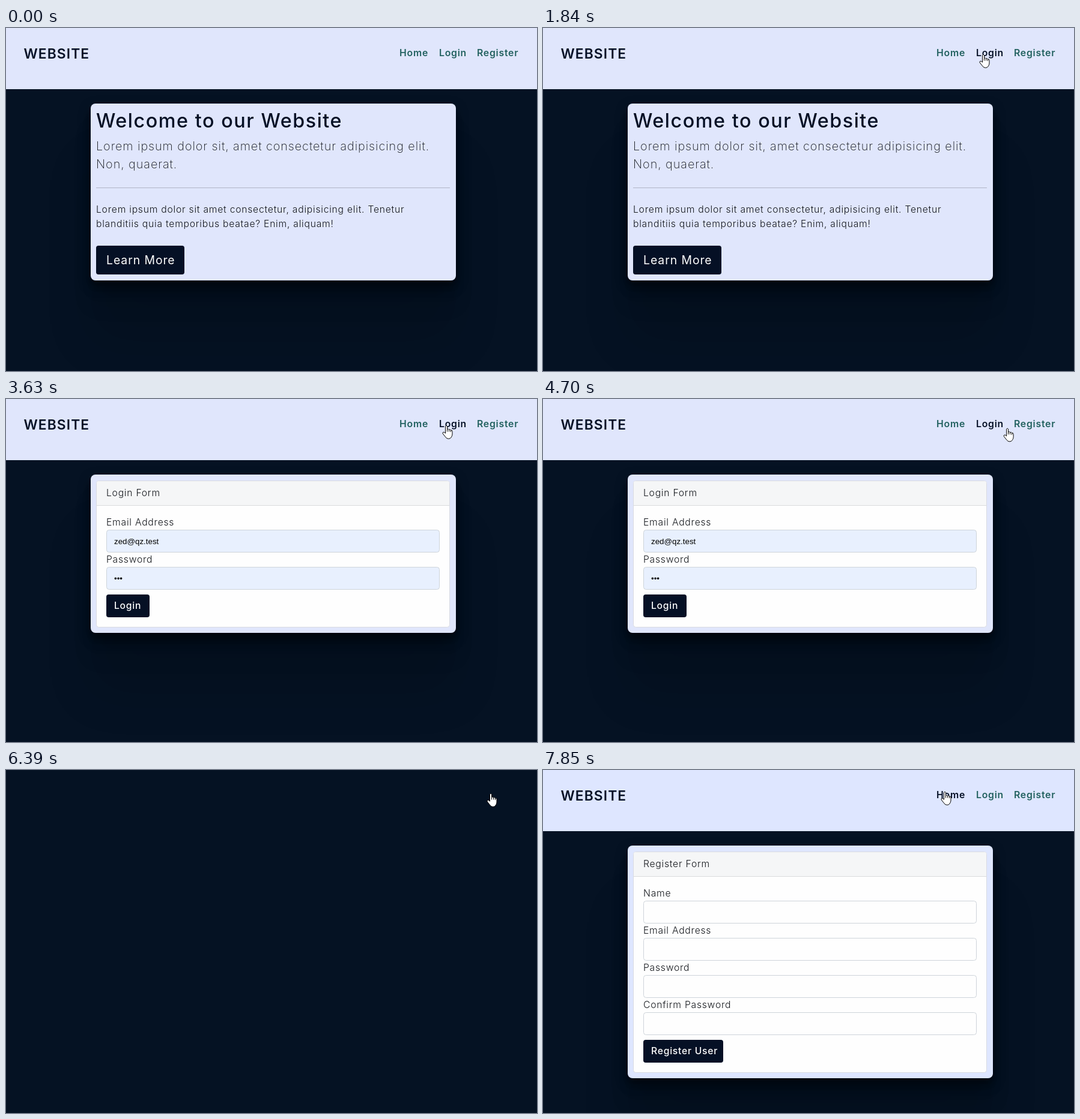
These frames come from a looping animation (884 px wide and 572 px high, 8 s). An HTML page:

```html
<!DOCTYPE html>
<html lang="en">
<head>
<meta charset="utf-8">
<title>Website</title>
<style>
  html, body { margin: 0; width: 100%; height: 100%; overflow: hidden; background: #051223; }
  #stage { --panel: #e0e6fc; --dark: #051025; position: relative; width: 884px; height: 572px; overflow: hidden; }
  #stage.register { --panel: #dee6ff; }
  #card {
    position: absolute; left: 141px; top: 126px; width: 608px; border-radius: 8px; background: var(--panel);
    box-shadow: 0 2.8px 2.2px #00000009, 0 6.7px 5.3px #0000000c, 0 12.5px 10px #0000000f,
      0 22.3px 17.9px #00000012, 0 41.8px 33.4px #00000016, 0 100px 80px #0000001f, 0 8px 20px #00000060;
  }
  svg { position: absolute; inset: 0; }
  text { font-family: Inter, sans-serif; letter-spacing: .048em; fill: #14171c; white-space: pre; }
  .title { fill: var(--dark); }
  .nav { fill: #22615f; }
  .nav.hover { fill: var(--dark); }
  .light { fill: #fff; }
  .preview { font-family: "Liberation Sans", Arial, sans-serif; letter-spacing: 0; fill: #000; }
  .button { fill: var(--dark); }
  .field { fill: #fefefe; stroke: #ced4da; }
  .filled .field { fill: #e8f0fe; }
  #cursor path { fill: #fff; stroke: #000; stroke-linejoin: round; }
</style>
</head>
<body>
<div id="stage">
  <div id="card"></div>
  <svg width="884" height="572">
    <g id="header"><rect width="884" height="102" fill="var(--panel)"/></g>
    <g id="home"></g>
    <g id="login"></g>
    <g id="register"></g>
    <g id="cursor">
      <circle id="press" r="12" fill="#ff0" fill-opacity=".45"/>
      <path id="arrow" d="M0 0V15.5L3.6 12.2L6.2 18L8.6 17L6.1 11.4H11Z"/>
      <g id="hand">
        <path d="M-1.5 1.5Q0-1 1.5 1.5V6.4Q3.4 5.2 4.5 7Q6.4 5.8 7.4 8Q10 7.2 10 10.2V15Q9.8 18 8 20Q7 22.3 3.8 22.3Q.6 22.3-1 19.8L-5.6 14Q-6.8 12-5 11.3Q-3.3 10.8-1.5 13.2Z"/>
        <path d="M1.5 6.4V10.5M4.5 7V10.5M7.4 8V11"/>
      </g>
    </g>
  </svg>
</div>
<script>
const $ = id => document.getElementById(id);
const show = (node, on) => { node.style.display = on ? '' : 'none'; };

function add(parent, tag, attrs, content = '') {
  const node = document.createElementNS('http://www.w3.org/2000/svg', tag);
  for (const key in attrs) node.setAttribute(key, attrs[key]);
  node.textContent = content;
  return parent.appendChild(node);
}
const label = (parent, x, y, size, weight, content, style = '') =>
  add(parent, 'text', { x, y, 'font-size': size, 'font-weight': weight, class: style }, content);
const box = (parent, x, y, width, height, style, rx = 4) =>
  add(parent, 'rect', { x, y, width, height, rx, class: style });

// Header and navigation
label($('header'), 29.5, 51, 22.8, 600, 'WEBSITE', 'title');
const links = [['Home', 655, 647, 713], ['Login', 721, 713, 776], ['Register', 784, 776, 860]]
  .map(([name, x, left, right]) => ({ left, right, node: label($('header'), x, 47, 15.8, 600, name, 'nav') }));

// Home page
const home = $('home');
label(home, 150, 166, 32.3, 500, 'Welcome to our Website', 'title');
label(home, 150, 204, 19.8, 200, 'Lorem ipsum dolor sit, amet consectetur adipisicing elit.');
label(home, 150, 234, 19.8, 200, 'Non, quaerat.');
add(home, 'rect', { x: 150, y: 266, width: 589, height: 1, fill: '#b0b4c6' });
label(home, 150, 308, 15.7, 300, 'Lorem ipsum dolor sit amet consectetur, adipisicing elit. Tenetur');
label(home, 150, 332, 15.7, 300, 'blanditiis quia temporibus beatae? Enim, aliquam!');
box(home, 150, 363, 147, 48, 'button');
label(home, 167, 394, 19.4, 400, 'Learn More', 'light');

// Form pages
function buildForm(page, title, fields, action, buttonWidth) {
  const end = 194 + fields.length * 62;
  add(page, 'rect', { x: 150.5, y: 136.5, width: 588, height: end - 74, rx: 4, fill: '#fefefe', stroke: '#d9dbe2' });
  add(page, 'path', { d: 'M151 177V140Q151 137 154 137H735Q738 137 738 140V177Z', fill: '#f5f6f7' });
  add(page, 'rect', { x: 151, y: 177, width: 587, height: 1, fill: '#d9dbdd' });
  label(page, 167, 162, 15.7, 300, title);
  fields.forEach((name, i) => {
    label(page, 167, 211 + i * 62, 15.7, 300, name);
    box(page, 167.5, 218.5 + i * 62, 554, 37, 'field');
  });
  box(page, 167, end + 8, buttonWidth, 38, 'button');
  label(page, 180, end + 32, 15.7, 500, action, 'light');
}
buildForm($('login'), 'Login Form', ['Email Address', 'Password'], 'Login', 72);
buildForm($('register'), 'Register Form', ['Name', 'Email Address', 'Password', 'Confirm Password'], 'Register User', 133);

const email = 'zed@qz.test';
const preview = add($('login'), 'g', {});
label(preview, 180, 242, 13.33, 400, email, 'preview');
label(preview, 180, 304, 13.33, 400, '•••', 'preview');
const accepted = add($('login'), 'g', {});
label(accepted, 180, 242, 15.7, 300, email);
label(accepted, 180.5, 303, 12, 400, '•••', 'preview').style.letterSpacing = '.5px';

// Pointer path: time, x, y
const path = [
  [500, 860, 314], [800, 785, 160], [1130, 656, 46], [1290, 667, 50], [1360, 672, 50],
  [1600, 708, 50], [1840, 733, 44], [4290, 733, 44], [4690, 772, 49], [5030, 807, 39],
  [7120, 807, 39], [7330, 786, 160], [7480, 752, 200], [7650, 700, 110], [7850, 669, 36], [8000, 669, 36]
];
function pointerAt(t) {
  const i = Math.max(1, path.findIndex(p => p[0] > t));
  const [t0, x0, y0] = path[i - 1], [t1, x1, y1] = path[i];
  const k = Math.max(0, (t - t0) / (t1 - t0));
  return [x0 + (x1 - x0) * k, y0 + (y1 - y0) * k];
}

const cardHeights = { home: 295, login: 264, register: 388 };
const within = (t, from, to) => t >= from && t < to;

function draw(t) {
  const scene = t < 3110 ? 'home' : t < 5860 ? 'login' : t < 6460 ? 'blank' : 'register';
  $('stage').className = scene;
  for (const name in cardHeights) show($(name), name === scene);
  show($('header'), scene !== 'blank');
  show($('card'), scene !== 'blank');
  $('card').style.height = (cardHeights[scene] || 0) + 'px';

  $('login').setAttribute('class', t >= 3630 ? 'filled' : '');
  show(preview, within(t, 3630, 5510));
  show(accepted, t >= 5510);

  const [x, y] = pointerAt(t);
  const visible = t >= 500;
  let overLink = false;
  for (const link of links) {
    const hover = visible && within(y, 22, 62) && within(x, link.left, link.right);
    link.node.classList.toggle('hover', hover);
    overLink ||= hover;
  }
  const waiting = within(t, 2440, 3030) || within(t, 5710, 6390);
  show($('cursor'), visible);
  $('cursor').setAttribute('transform', `translate(${x} ${y})`);
  show($('hand'), overLink && !waiting);
  show($('arrow'), !overLink || waiting);
  show($('press'), within(t, 2160, 2300) || within(t, 5370, 5510));
}

const start = performance.now();
function tick() {
  draw((performance.now() - start) % 8000);
  requestAnimationFrame(tick);
}
tick();
</script>
</body>
</html>
```
